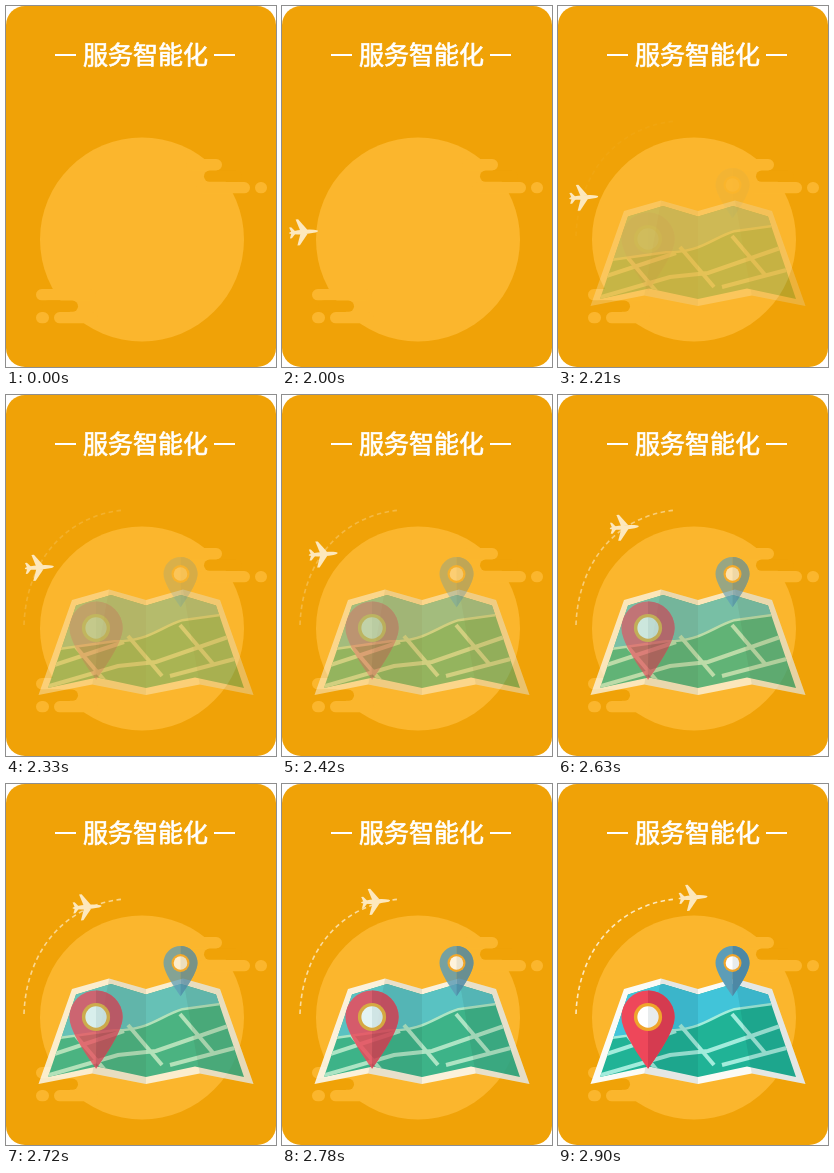
An HTML page with a canvas for the animation above (4570 ms loop, 270 px wide and 361 px high).

```html
<!DOCTYPE html>
<html lang="zh-CN">
<head>
<meta charset="utf-8">
<title>服务智能化</title>
<style>
  html, body { margin: 0; width: 100%; height: 100%; overflow: hidden; background: #fff; }
  body { position: relative; }
  canvas { display: block; width: 100%; height: 100%; }
  h1 {
    position: absolute; left: 70px; top: 29px; width: 139px; margin: 0;
    font: 400 25px/36px "Noto Sans CJK SC", "Noto Sans CJK", sans-serif;
    -webkit-text-stroke: 0.7px #fff;
    color: #fff; text-align: center; white-space: nowrap;
  }
</style>
</head>
<body>
<canvas id="stage"></canvas>
<h1>服务智能化</h1>
<script>
const W = 270, H = 361, LOOP = 4570, START = 2000, STEP = 30, LAST = 30;
const ORANGE = '#f0a207', GLOW = '#fbb62d', CREAM = '#fde8bd';
const LAND = '#20b396', WATER = '#41c4d9', ROAD = '#a2ecdc', PAPER = '#fbfbf6';
const SHADE = 'rgba(0, 40, 50, .09)';
const scale = window.devicePixelRatio || 1;

function prepare(canvas) {
  canvas.width = Math.round(W * scale);
  canvas.height = Math.round(H * scale);
  const c = canvas.getContext('2d');
  c.scale(scale, scale);
  return c;
}

function layer(draw) {
  const canvas = document.createElement('canvas');
  draw(prepare(canvas));
  return canvas;
}

function trace(c, points) {
  c.beginPath();
  points.forEach(([x, y]) => c.lineTo(x, y));
}

function fill(c, points, color) {
  trace(c, points);
  c.fillStyle = color;
  c.fill();
}

function disc(c, x, y, r, color) {
  c.beginPath();
  c.arc(x, y, r, 0, Math.PI * 2);
  c.fillStyle = color;
  c.fill();
}

function box(c, left, top, width, height, radius, color) {
  c.beginPath();
  c.roundRect(left, top, width, height, radius);
  c.fillStyle = color;
  c.fill();
}

function pill(c, left, right, top, color) {
  box(c, left, top, right - left, 11.3, 5.65, color);
}

const card = layer(c => {
  box(c, 0, 0, W, H, 19, ORANGE);
  disc(c, 136, 233.5, 102, GLOW);
  // cloud, upper right
  pill(c, 180, 216, 153, GLOW);
  pill(c, 198, 236, 164.5, ORANGE);
  pill(c, 190, 244, 176, GLOW);
  pill(c, 249, 261, 176, GLOW);
  // cloud, lower left
  pill(c, 30, 90, 283, GLOW);
  pill(c, 36, 72, 294.5, ORANGE);
  pill(c, 48, 92, 306, GLOW);
  pill(c, 30, 43, 306, GLOW);
  c.fillStyle = '#fff';
  c.fillRect(49, 48, 21, 2);
  c.fillRect(208, 48, 21, 2);
});

// zigzag edge of the folded sheet, centred on the middle fold
function edge(halfWidth, y) {
  return [-1, -0.5, 0, 0.5, 1].map((u, i) => [140 + u * halfWidth, y - (i % 2) * 10.5]);
}

const map = layer(c => {
  const top = edge(74, 205), bottom = edge(107.5, 300);
  const sheet = (a, b) => [...a, ...b.slice().reverse()];
  const road = (...points) => { trace(c, points); c.stroke(); };

  fill(c, sheet(top, bottom), PAPER);
  c.save();
  trace(c, sheet(edge(70, 210.5), edge(98, 293)));
  c.clip();
  c.fillStyle = LAND;
  c.fillRect(0, 180, W, 130);

  // water above the shore road
  c.beginPath();
  c.moveTo(0, 260);
  c.lineTo(108, 245);
  c.bezierCurveTo(140, 246, 152, 232, 176, 224);
  c.lineTo(W, 211);
  c.strokeStyle = ROAD;
  c.lineWidth = 5;
  c.stroke();
  c.lineTo(W, 180);
  c.lineTo(0, 180);
  c.fillStyle = WATER;
  c.fill();

  c.lineWidth = 4;
  road([36, 274], [118, 247]);
  road([40, 292], [112, 271], [150, 267], [228, 240]);
  road([164, 281], [236, 262]);
  for (let k = 0; k < 3; k++) {
    const x = 70 + 52 * k, y = 252 - 11 * k;
    road([x, y], [x + 34, y + 40]);
  }
  c.restore();

  [1, 3].forEach(i => fill(c, [top[i], top[i + 1], bottom[i + 1], bottom[i]], SHADE));
});

function pin(c, x, y, r, light, dark) {
  const tip = y + r * 1.95;
  const half = (side, color) => {
    c.beginPath();
    c.moveTo(x, y - r);
    c.arc(x, y, r, -Math.PI / 2, side > 0 ? Math.PI * 0.13 : Math.PI * 0.87, side < 0);
    c.quadraticCurveTo(x + side * r * 0.72, y + r * 0.95, x, tip);
    c.fillStyle = color;
    c.fill();
  };
  half(-1, light);
  half(1, light);
  half(1, dark);
  disc(c, x, y, r * 0.53, '#efa52b');
  disc(c, x, y, r * 0.4, '#fff');
  c.beginPath();
  c.arc(x, y, r * 0.4, -Math.PI / 2, Math.PI / 2);
  c.fillStyle = SHADE;
  c.fill();
}

const marks = layer(c => {
  c.strokeStyle = CREAM;
  c.lineWidth = 1.6;
  c.setLineDash([4.5, 3.5]);
  c.beginPath();
  c.moveTo(18, 230);
  c.bezierCurveTo(20, 170, 56, 121, 118, 115);
  c.stroke();
  pin(c, 174.5, 179, 17, '#5d9db7', '#4d88a5');
  pin(c, 90, 233, 26.6, '#ee475a', '#d53b50');
});

function bezier(a, b, c, d, s) {
  const r = 1 - s;
  return r * r * r * a + 3 * r * r * s * b + 3 * r * s * s * c + s * s * s * d;
}

function plane(c, progress) {
  // steady climb with a late burst of speed
  const s = 0.85 * progress + 0.15 * progress ** 10;
  c.save();
  c.translate(bezier(21.5, 18, 71, 135, s), bezier(226, 168, 104, 113.5, s));
  c.rotate(-0.07);
  c.fillStyle = CREAM;
  c.beginPath();
  c.ellipse(0, 0, 14.5, 2.2, 0, 0, Math.PI * 2);
  c.fill();
  [-1, 1].forEach(side => {
    fill(c, [[4, 2 * side], [-4.5, 13 * side], [-7, 13 * side], [-3, side]], CREAM);
    fill(c, [[-8, side], [-12, 5.5 * side], [-14, 5.5 * side], [-12, 0]], CREAM);
  });
  c.restore();
}

const ctx = prepare(document.getElementById('stage'));

function show(image, alpha) {
  ctx.globalAlpha = Math.max(0, alpha);
  ctx.drawImage(image, 0, 0, W, H);
  ctx.globalAlpha = 1;
}

function render() {
  const time = performance.now() % LOOP;
  ctx.clearRect(0, 0, W, H);
  show(card, 1);
  if (time >= START) {
    const progress = Math.min(LAST, Math.floor((time - START) / STEP)) / LAST;
    show(map, progress);
    show(marks, (progress - 0.2) / 0.8);
    plane(ctx, progress);
  }
  requestAnimationFrame(render);
}
render();
</script>
</body>
</html>
```
